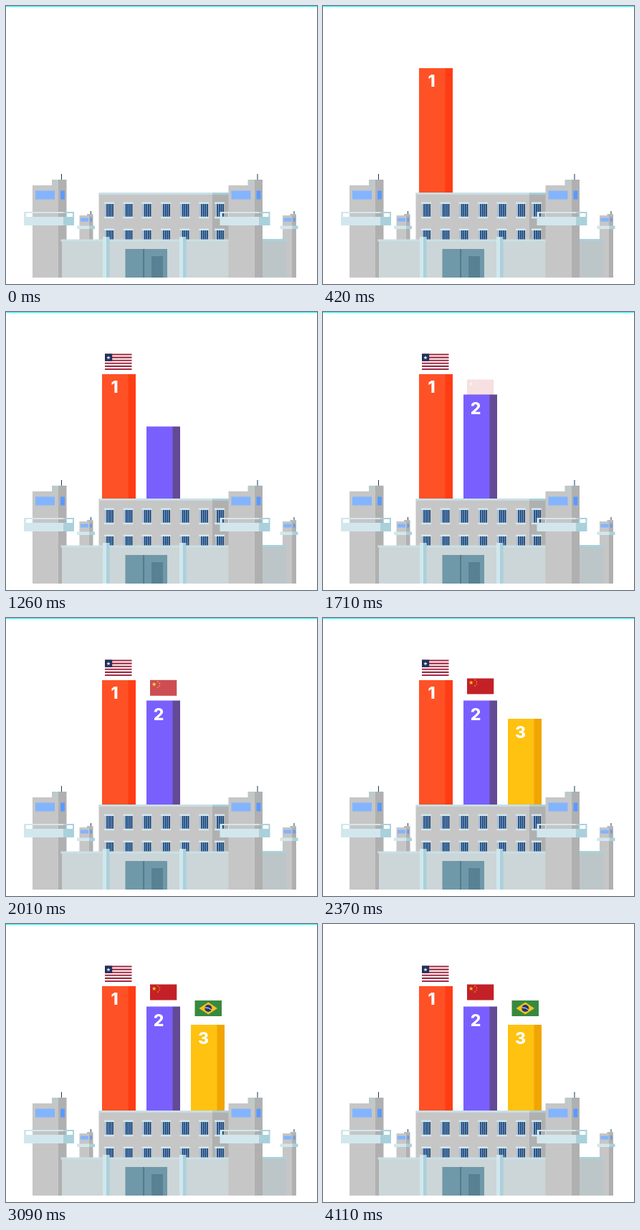
Recreate the animation shown at these times as an HTML page. Size 434x389 px, loop 4500 ms.

```html
<!DOCTYPE html>
<html lang="en">
<head>
<meta charset="utf-8">
<title>Prison ranking</title>
<style>
  html, body { margin: 0; width: 100%; height: 100%; overflow: hidden; background: #fff; }
  svg { display: block; width: 434px; height: 389px; }
  text { font: 800 23px Inter, "Open Sans", sans-serif; fill: #fff; text-anchor: middle; }
  .wall { fill: #c6c6c6; }
  .shade { fill: #b0b0b0; }
  .pale { fill: #d2e7ed; }
  .teal { fill: #a9d1db; }
  .glass { fill: #82b4ff; }
  .glass2 { fill: #5b99ff; }
  .iron { fill: #143a5e; }
</style>
</head>
<body>
<svg viewBox="0 0 434 389">
  <defs>
    <path id="star" d="M0-1 .225-.309 .951-.309 .363.118 .588.809 0 .382-.588.809-.363.118-.951-.309-.225-.309Z"/>
    <g id="cell">
      <rect class="glass" y="277" width="12" height="18" fill-opacity=".8"/>
      <path d="M0 277h2v18h-2z" fill="#a9bed2"/>
      <path class="iron" d="M2.4 277h1.6v18h-1.6zM5 277h1.6v18h-1.6zM7.6 277h1.6v18h-1.6zM10.2 277h1.6v18h-1.6z"/>
      <path class="pale" d="M-1 274.5h14v2.5h-14zM-1 294.8h14v2.5h-14z"/>
    </g>
    <g id="tower">
      <rect class="wall" x="37" y="251" width="36" height="129"/>
      <rect class="shade" x="73" y="251" width="11.5" height="129"/>
      <rect x="64" y="243" width="9" height="8" fill="#bfc9ca"/>
      <rect class="shade" x="73" y="243" width="11.5" height="8"/>
      <rect class="iron" x="77" y="235" width="1" height="8"/>
      <rect class="glass" x="41" y="258.5" width="27" height="12"/>
      <rect class="glass2" x="76" y="258.5" width="6" height="12"/>
    </g>
    <g id="deck">
      <path class="pale" d="M25 288h55v19h-55zM28 290v5h8.5v-5zM37.500 290v5h42.500v-5z" fill-rule="evenodd"/>
      <path class="teal" d="M80 288h15v19h-15zM80 290v5h3.500v-5zM85 290v5h8v-5z" fill-rule="evenodd"/>
    </g>
    <g id="turret">
      <rect class="wall" x="102.500" y="293" width="13" height="87"/>
      <rect class="shade" x="115.500" y="293" width="6" height="87"/>
      <rect x="113" y="291" width="8.500" height="2.500" fill="#b5bbbc"/>
      <rect class="iron" x="118" y="287" width="1" height="4"/>
      <rect class="glass" x="104" y="296.500" width="11" height="5"/>
      <rect class="glass2" x="117.500" y="296.500" width="2.500" height="5"/>
      <rect class="pale" x="99" y="307.500" width="18" height="4.500"/>
      <rect class="teal" x="116" y="307.500" width="8" height="4.500"/>
    </g>
    <g id="post">
      <rect class="pale" x="135" y="323" width="5" height="57"/>
      <rect class="teal" x="140" y="323" width="4.500" height="57"/>
    </g>
  </defs>

  <rect id="line" width="434" height="1" fill="#0ff"/>

  <g class="bar"><path fill="#ff5126"/><path fill="#ff3d14"/></g>
  <g class="bar"><path fill="#7a5fff"/><path fill="#644a94"/></g>
  <g class="bar"><path fill="#ffc211"/><path fill="#f0a502"/></g>
  <!-- White digits only show once a bar is behind them -->
  <text x="151.500" y="113">1</text>
  <text x="213" y="143">2</text>
  <text x="275.500" y="168">3</text>

  <g class="flag">
    <rect x="138" y="58.500" width="37.500" height="22.500" fill="#fff"/>
    <path d="M156.750 58.500v22.500" stroke="#9f2942" stroke-width="37.500" stroke-dasharray="2.045"/>
    <rect x="138" y="58.500" width="10.200" height="10.200" fill="#22305c"/>
    <use href="#star" transform="translate(143 63.800) scale(2.900)" fill="#fff"/>
  </g>
  <g class="flag">
    <rect x="201" y="84.500" width="37.300" height="22" fill="#c32127"/>
    <g fill="#ffc91c">
      <use href="#star" transform="translate(206.700 90.500) scale(3.300)"/>
      <use href="#star" transform="translate(212 86.700) rotate(20) scale(1.200)"/>
      <use href="#star" transform="translate(214.300 89.200) rotate(40) scale(1.200)"/>
      <use href="#star" transform="translate(214.300 92.400) scale(1.200)"/>
      <use href="#star" transform="translate(212 95) rotate(20) scale(1.200)"/>
    </g>
  </g>
  <g class="flag">
    <rect x="263.500" y="107" width="37.500" height="22" fill="#38893f"/>
    <path d="M269.500 118 282.300 109.500 295 118 282.300 126.500Z" fill="#f7c21c"/>
    <circle cx="282.300" cy="118" r="5" fill="#29356f"/>
    <path d="M277.500 116.900q5.500-.2 9.300 3.100" fill="none" stroke="#fff" stroke-width="1"/>
  </g>

  <!-- Cell block -->
  <rect class="wall" x="129.500" y="262" width="158.500" height="66"/>
  <rect class="shade" x="288" y="262" width="23" height="66"/>
  <rect x="129.500" y="261" width="158.500" height="2.800" fill="#c9e0e6"/>
  <rect class="teal" x="288" y="261" width="23" height="2.800"/>
  <g id="cells"></g>

  <!-- Perimeter -->
  <use href="#turret"/>
  <use href="#turret" x="283.500"/>
  <use href="#tower"/>
  <rect x="357" y="327" width="34.500" height="53" fill="#bcc6c8"/>
  <rect class="teal" x="357" y="326" width="34.500" height="3"/>
  <rect x="78" y="328" width="234" height="52" fill="#ccd5d7"/>
  <rect x="76.500" y="326.500" width="235" height="3" fill="#c9e0e6"/>
  <use href="#deck"/>
  <use href="#post"/>
  <use href="#post" x="107"/>
  <rect x="166.500" y="340" width="58.500" height="40" fill="#6f98a9"/>
  <rect x="203" y="350" width="16" height="30" fill="#588193"/>
  <rect x="191.500" y="340" width="1.200" height="40" fill="#446878"/>
  <use href="#tower" x="273.500"/>
  <use href="#deck" x="273.500"/>
</svg>
<script>
  const LOOP = 4500, TICK = 30, BASE = 262, RISE = 11.5;
  const bars = [
    { x: 134, top: 87, start: 60, time: 360 },
    { x: 196, top: 115.5, start: 1110, time: 270 },
    { x: 258, top: 141, start: 2160, time: 210 }
  ];
  const flags = [
    { start: 600, time: 420 },
    { start: 1650, time: 450 },
    { start: 2670, time: 420 }
  ];
  const barNodes = document.querySelectorAll('.bar');
  const flagNodes = document.querySelectorAll('.flag');
  const line = document.getElementById('line');

  const progress = (t, { start, time }) => Math.min(1, Math.max(0, (t - start) / time));
  // Fast start, gentle slowdown
  const ease = p => p + p * (1 - p) * (0.69 - 0.25 * p);

  document.getElementById('cells').innerHTML = [0, 37].map(y =>
    [138, 164.5, 190.5, 217, 243.5, 270, 292].map(x =>
      `<use href="#cell" x="${x}" y="${y}"/>`).join('')).join('');

  function draw(t) {
    bars.forEach((bar, i) => {
      const p = progress(t, bar);
      const h = p ? ease(p) * (261 - bar.top) + 1 : 0;
      const [front, side] = barNodes[i].children;
      front.setAttribute('d', `M${bar.x} ${BASE}v${-h}h37v${h}z`);
      side.setAttribute('d', `M${bar.x + 36.5} ${BASE}v${-h}h10.500v${h}z`);
    });
    flags.forEach((flag, i) => {
      const p = progress(t, flag);
      flagNodes[i].setAttribute('opacity', p);
      flagNodes[i].setAttribute('transform', `translate(0 ${RISE * (1 - p)})`);
    });
    line.setAttribute('opacity', t < 4110 ? 1 : 0);
  }

  const origin = performance.now();
  function loop() {
    const t = (performance.now() - origin) % LOOP;
    draw(Math.floor(t / TICK) * TICK);
    requestAnimationFrame(loop);
  }
  loop();
</script>
</body>
</html>
```
